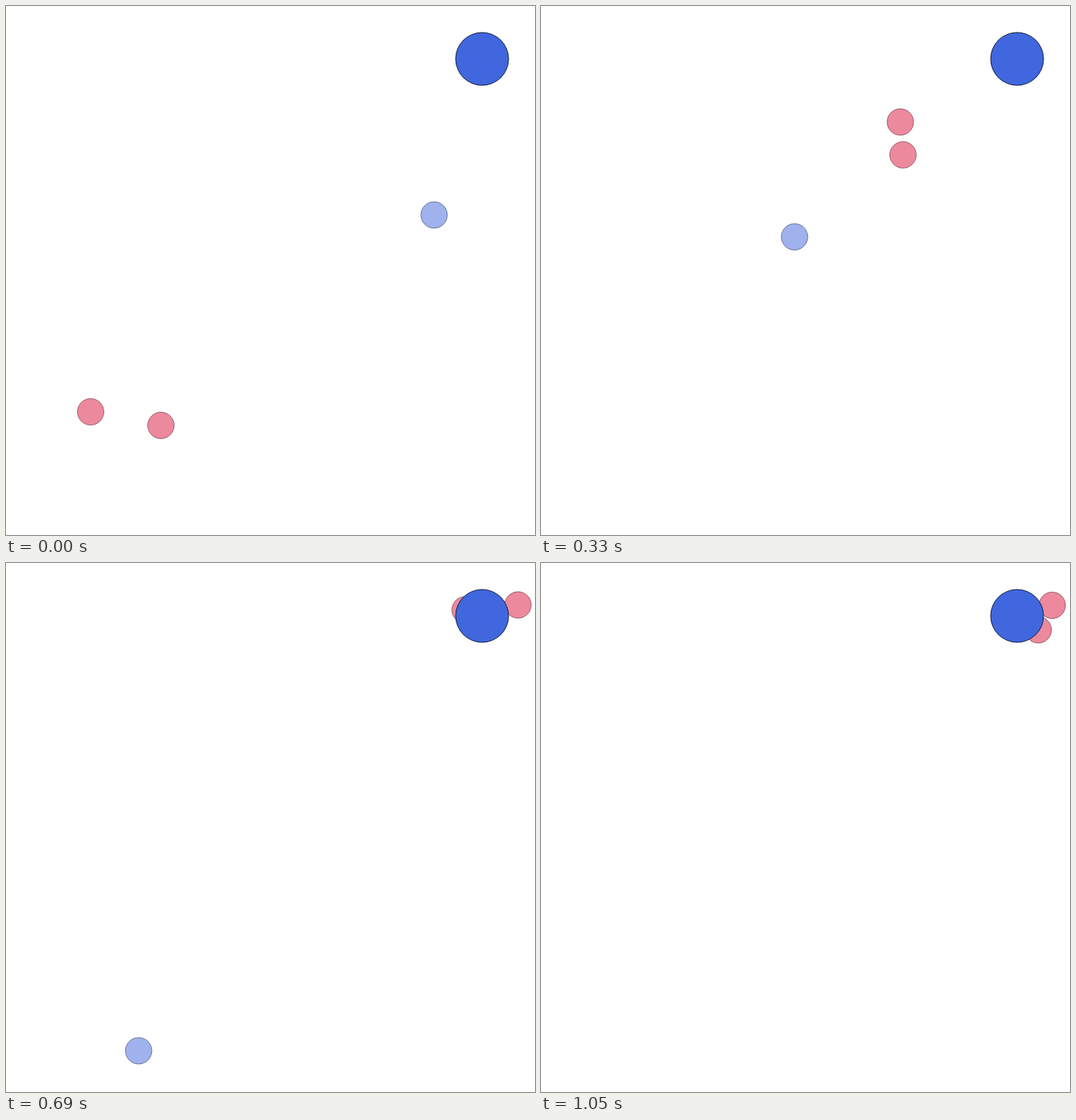
Write an HTML page with a canvas that moves like this. It is 700 px wide and 700 px high and loops after 1080 ms.

```html
<!DOCTYPE html>
<html>
<head>
<meta charset="utf-8">
<style>
html, body { margin: 0; height: 100%; overflow: hidden; background: #fff; }
canvas { display: block; }
</style>
</head>
<body>
<canvas id="stage" width="700" height="700"></canvas>
<script>
const ctx = document.getElementById('stage').getContext('2d');
const STEP = 30, STEPS = 36;
const BLUE = '#4067dd', RED = '#dc143c';

// Key steps shared by all movers, with the turning points of each path
const keys = [0, 7, 11, 15, 18, 23, 30, 35];
const movers = [
  { color: BLUE, path: [[566.5, 276.5], [327.5, 276.5], [335.5, 305.5], [328.5, 431.5],
    [290, 516], [175.5, 645.5]] },
  { color: RED, path: [[112, 537], [341.5, 317], [479, 197], [618, 79],
    [684, 31], [677.5, 55.5], [678, 56.5], [676.5, 56]] },
  { color: RED, path: [[205, 555], [332.5, 265.5], [475.5, 153.5], [645, 91],
    [681, 70], [607.5, 62], [652, 91], [658, 88.5]] }
];

// Smooth curve through the points; past the last one it runs straight on
function position(path, t) {
  const last = path.length - 1;
  const span = k => keys[k + 1] - keys[k];
  let i = 0;
  while (i < last && t >= keys[i + 1]) i++;

  return [0, 1].map(axis => {
    const p = k => path[k][axis];
    const slope = k => (p(k + 1) - p(k)) / span(k);
    const speed = k => {
      if (k === 0) return slope(0);
      if (k === last) return slope(last - 1);
      return (slope(k - 1) * span(k) + slope(k) * span(k - 1)) / (span(k - 1) + span(k));
    };
    if (i === last) return p(last) + speed(last) * (t - keys[last]);

    const u = (t - keys[i]) / span(i), v = 1 - u;
    return p(i) * (1 + 2 * u) * v * v + p(i + 1) * (1 + 2 * v) * u * u
      + span(i) * u * v * (speed(i) * v - speed(i + 1) * u);
  });
}

function disc([x, y], r, color, alpha) {
  const circle = radius => {
    ctx.beginPath();
    ctx.arc(x, y, radius, 0, 2 * Math.PI);
  };
  ctx.globalAlpha = alpha;
  ctx.fillStyle = color;
  ctx.lineWidth = 0.7;
  circle(r + 0.3);
  ctx.fill();
  circle(r);
  ctx.stroke();
}

function draw() {
  const t = Math.floor(performance.now() / STEP) % STEPS;
  ctx.clearRect(0, 0, 700, 700);
  for (const { color, path } of movers) disc(position(path, t), 17.5, color, 0.5);
  disc([630, 70], 35, BLUE, 1);
  requestAnimationFrame(draw);
}
draw();
</script>
</body>
</html>
```
